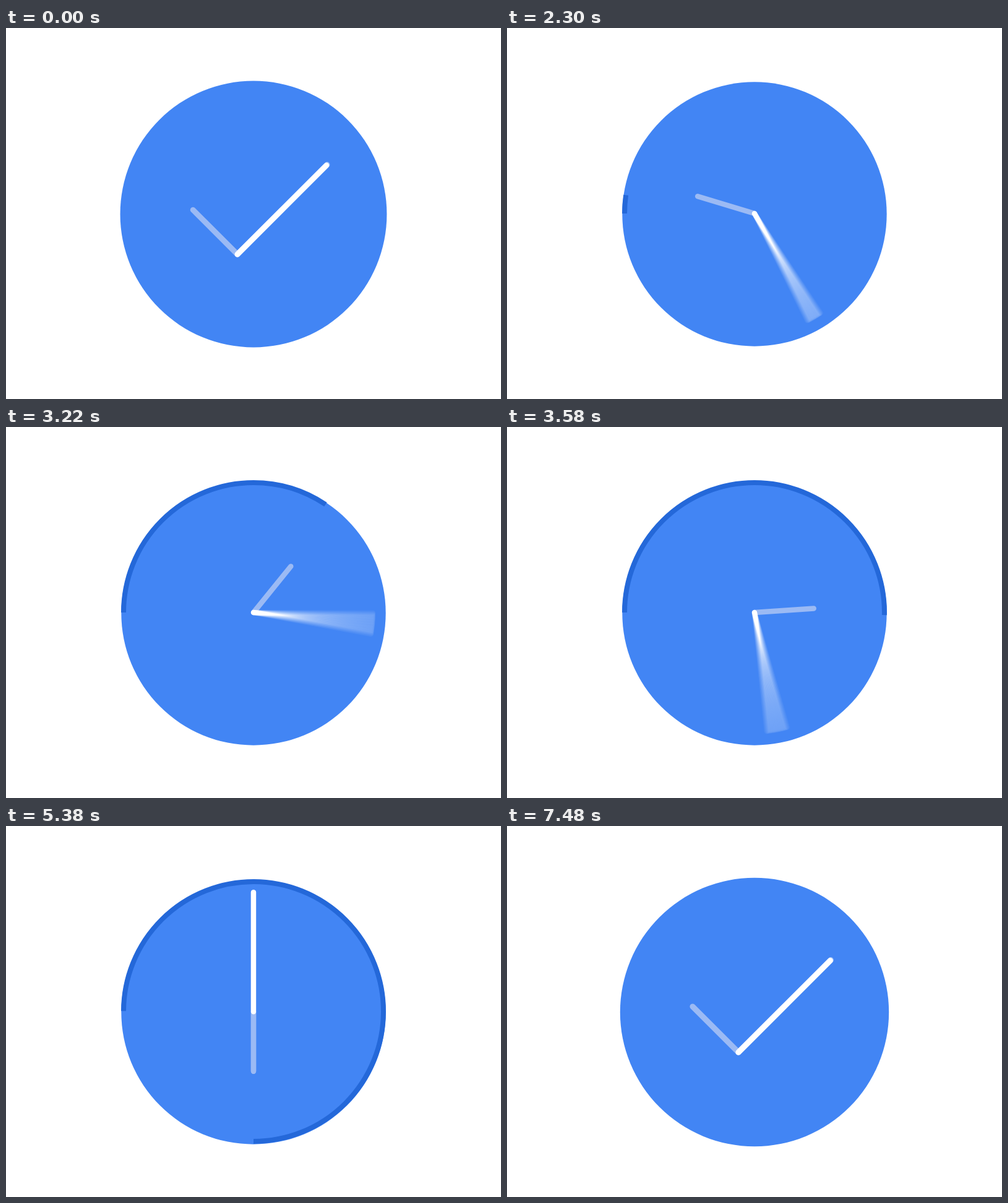
An HTML page with a canvas that plays this animation: 800x600 px, repeating every 7500 ms.

```html
<!DOCTYPE html>
<html lang="en">
<head>
<meta charset="utf-8">
<title>Clock to check</title>
<style>
html, body { margin: 0; width: 100%; height: 100%; overflow: hidden; background: #fff; }
canvas { display: block; width: 800px; height: 600px; }
</style>
</head>
<body>
<canvas id="stage" width="800" height="600"></canvas>
<script>
const LOOP = 7500, SHUTTER = 8.33, SAMPLES = 17;
const BLUE = '#4285f4', DARK = '#2468d9', PALE = '#9bbaf4', WHITE = '#fff';
const LONG = 193, SHORT = 96, LINE = 8.4;

const ctx = document.getElementById('stage').getContext('2d');
const layer = document.createElement('canvas');
layer.width = 800;
layer.height = 600;
const blur = layer.getContext('2d');

const rad = deg => deg * Math.PI / 180;
const progress = (t, from, to) => Math.min(1, Math.max(0, (t - from) / (to - from)));

// Soft start and stop, the same as cubic-bezier(p, 0, 1 - p, 1).
function ease(t, from, to, p = 1 / 6) {
  const x = progress(t, from, to);
  let low = 0, high = 1;
  for (let i = 0; i < 30; i++) {
    const s = (low + high) / 2, r = 1 - s;
    if (3 * s * r * (r * p + s * (1 - p)) + s ** 3 < x) low = s;
    else high = s;
  }
  return low * low * (3 - 2 * low);
}

// Swells from 0 to 1 and back.
const pulse = (t, from, to) => Math.sin(Math.PI * progress(t, from, to)) ** 2;

const toClock = t => ease(t, 1530, 2040);
const toArrow = t => ease(t, 5370, 6000);
const toCheck = t => ease(t, 6550, 6850);

const hubX = t => 374 + 26 * (toClock(t) - toCheck(t));
const hubY = t => 366 - 66 * toClock(t) + 96.7 * toArrow(t) - 30.7 * toCheck(t);
const minute = t => 45 * (1 - toClock(t) + toCheck(t)) + 7 * 360 * ease(t, 2040, 4540);
const hour = t => -45 * (1 + toClock(t)) + 270 * ease(t, 2036, 4496);
const spread = t => 45 * ease(t, 6000, 6240);
const arcEnd = t => 270 * ease(t, 2040, 4540, 1 / 3);
const arcStart = t => 270 * ease(t, 5370, 6000, 1 / 3);
const radius = t => 213.7 + 6.4 * pulse(t, 6520, 6850) + 7 * pulse(t, 7300, 7540);
const scale = t => 1 + 0.12 * pulse(t, 7330, 7555);

function hand(c, x, y, deg, size, length, color) {
  c.strokeStyle = color;
  c.lineWidth = LINE * size;
  c.lineCap = 'round';
  c.beginPath();
  c.moveTo(x, y);
  c.lineTo(x + length * size * Math.sin(rad(deg)), y - length * size * Math.cos(rad(deg)));
  c.stroke();
}

function longHand(c, t) {
  hand(c, hubX(t), hubY(t), minute(t), scale(t), LONG, WHITE);
}

function drawLong(t) {
  const half = SHUTTER / 2;
  const still = [hubX, hubY, minute, scale]
    .every(f => Math.abs(f(t + half) - f(t - half)) < 0.001);
  if (still) {
    longHand(ctx, t);
    return;
  }
  blur.clearRect(0, 0, 800, 600);
  blur.globalCompositeOperation = 'lighter';
  blur.globalAlpha = 1 / SAMPLES;
  for (let i = 0; i < SAMPLES; i++) {
    longHand(blur, t + SHUTTER * (i / (SAMPLES - 1) - 0.5));
  }
  ctx.drawImage(layer, 0, 0);
}

function drawShort(t) {
  if (t < 5370) {
    hand(ctx, hubX(t), hubY(t), hour(t), scale(t), SHORT, PALE);
    return;
  }
  // The short hand stays put while the long one slides over it, then opens into two.
  const y = hubY(t) + 96.7 * (1 - toArrow(t));
  for (const side of [-1, 1]) {
    hand(ctx, hubX(t), y, side * spread(t), scale(t), SHORT, PALE);
  }
}

function drawArc(t) {
  const from = arcStart(t), to = arcEnd(t);
  if (to - from < 0.01) return;
  ctx.strokeStyle = DARK;
  ctx.lineWidth = 8;
  ctx.beginPath();
  ctx.lineCap = 'butt';
  ctx.arc(400, 300, 210, rad(180 + from), rad(180 + to));
  ctx.stroke();
}

function draw(now) {
  // The closing pulse runs past the seam, so a cycle is counted from the resting check.
  const t = (now + LOOP - 1000) % LOOP + 1000;
  ctx.fillStyle = WHITE;
  ctx.fillRect(0, 0, 800, 600);
  ctx.fillStyle = BLUE;
  ctx.beginPath();
  ctx.arc(400, 301, radius(t), 0, 2 * Math.PI);
  ctx.fill();
  drawArc(t);
  drawShort(t);
  drawLong(t);
}

let start;
function tick(now) {
  if (start === undefined) start = now;
  draw(Math.max(0, now - start));
  requestAnimationFrame(tick);
}
draw(0);
requestAnimationFrame(tick);
</script>
</body>
</html>
```
